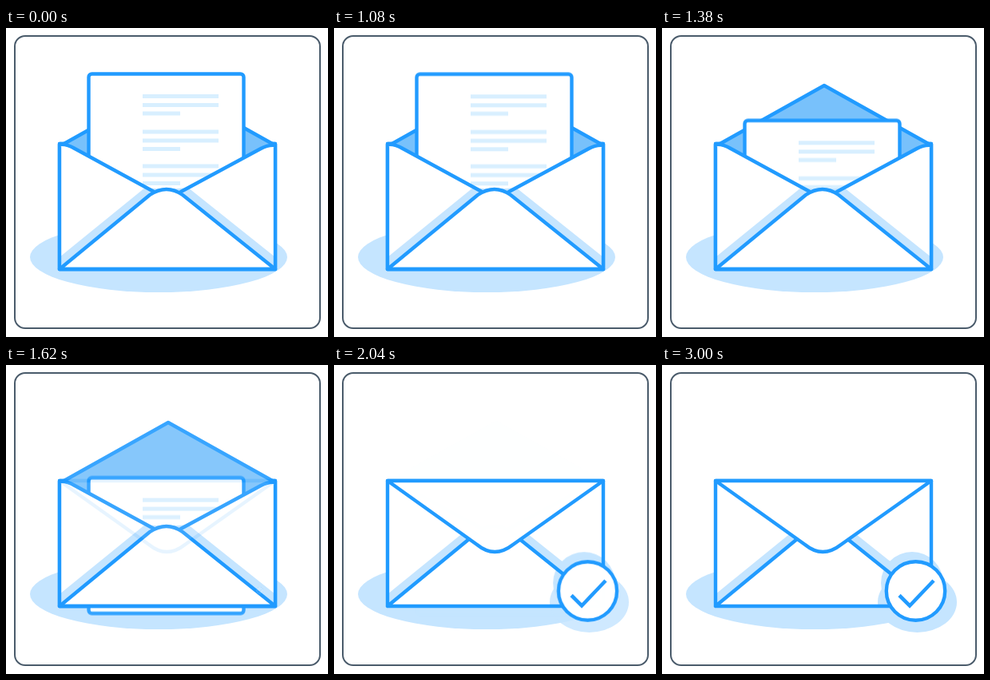
Recreate the animation shown at these times as an HTML page without scripts. Size 403x387 px, loop 3.06 s.

```html
<!DOCTYPE html>
<html lang="en">
<head>
<meta charset="utf-8">
<title>Envelope sent</title>
<style>
  :root { --blue: #219bff; --pale: #c5e5ff; --mid: #78c1fb; --loop: 3060ms linear infinite; }
  html, body { margin: 0; width: 100%; height: 100%; overflow: hidden; background: #fff; }
  svg { display: block; width: 100%; height: 100%; }

  .ink { stroke: var(--blue); stroke-width: 4.4; stroke-linejoin: round; stroke-linecap: round; }
  .white { fill: #fff; }
  .pale { fill: var(--pale); }
  .none { fill: none; }
  .text { stroke: #d8efff; stroke-width: 5.2; fill: none; }

  .paper { animation: slide var(--loop); }
  .open { animation: dissolve var(--loop); }
  .badge, .glow { transform-origin: 317.5px 282.5px; animation: pop var(--loop); }
  .ground { animation: show var(--loop); }

  @keyframes slide {
    0% { transform: none; }
    35.29% { transform: none; animation-timing-function: ease-out; }
    54.9%, 100% { transform: translateY(85px); }
  }
  @keyframes dissolve {
    0% { opacity: 1; }
    51.96% { opacity: 1; animation-timing-function: ease-out; }
    67.65%, 100% { opacity: 0; }
  }
  @keyframes pop {
    0% { transform: scale(0); }
    51.96% { transform: scale(0); animation-timing-function: cubic-bezier(0, 0, .48, 1); }
    67.65%, 100% { transform: scale(1); }
  }
  @keyframes show {
    0%, 57.8% { opacity: 0; }
    68.6%, 100% { opacity: 1; }
  }
</style>
</head>
<body>
<svg viewBox="0 0 403 387" preserveAspectRatio="none">
  <defs>
    <path id="stripes" class="pale" d="M67 302V287L174 200L200 202L228 200L337 287V302L221 209H180Z"/>
    <path id="lines" class="text" d="M171 85.5h95M171 96.5h95M171 107h47"/>
  </defs>

  <rect x="11" y="10" width="382" height="366" rx="13" fill="#fff" stroke="#4a5b6b" stroke-width="2"/>
  <ellipse class="pale" cx="191" cy="287" rx="161" ry="44"/>

  <!-- closed envelope -->
  <g>
    <path class="white" d="M67 145H337V302H67Z"/>
    <use href="#stripes"/>
    <path class="white" d="M67 302L180 209H221L337 302Z"/>
    <ellipse class="pale ground" cx="319.5" cy="297" rx="49.5" ry="38"/>
    <circle class="pale glow" cx="313" cy="273" r="39"/>
    <path class="ink none" d="M67 302L180 209M337 302L221 209M67 145H337V302H67Z"/>
    <path class="ink white" d="M67 145L179 225Q201 243 224 225L337 145Z"/>
    <g class="badge">
      <circle class="ink white" cx="317.5" cy="283" r="36.7"/>
      <path class="none" stroke="#219bff" stroke-width="4.6" d="M297 288.5L310 301.5L340 270"/>
    </g>
  </g>

  <!-- open envelope with letter -->
  <g class="open">
    <path fill="#78c1fb" d="M67 147L203 72L337 147L203 215Z"/>
    <path class="ink none" d="M69 147L203 72L337 147"/>
    <g class="paper">
      <rect class="ink white" x="103.5" y="57.5" width="194" height="170" rx="4"/>
      <use href="#lines"/>
      <use href="#lines" y="44.5"/>
      <use href="#lines" y="87.5"/>
    </g>
    <path class="white" d="M67 146Q76 145 86 151L185 205Q201 199 219 205L319 151Q328 146 337 147V302H67Z"/>
    <use href="#stripes"/>
    <path class="ink white" d="M67 302L180 209Q201 195 221 209L337 302Z"/>
    <path class="ink none" d="M185 205L86 151Q76 145 67 146V302H337V147Q328 146 319 151L219 205"/>
  </g>
</svg>
</body>
</html>
```
